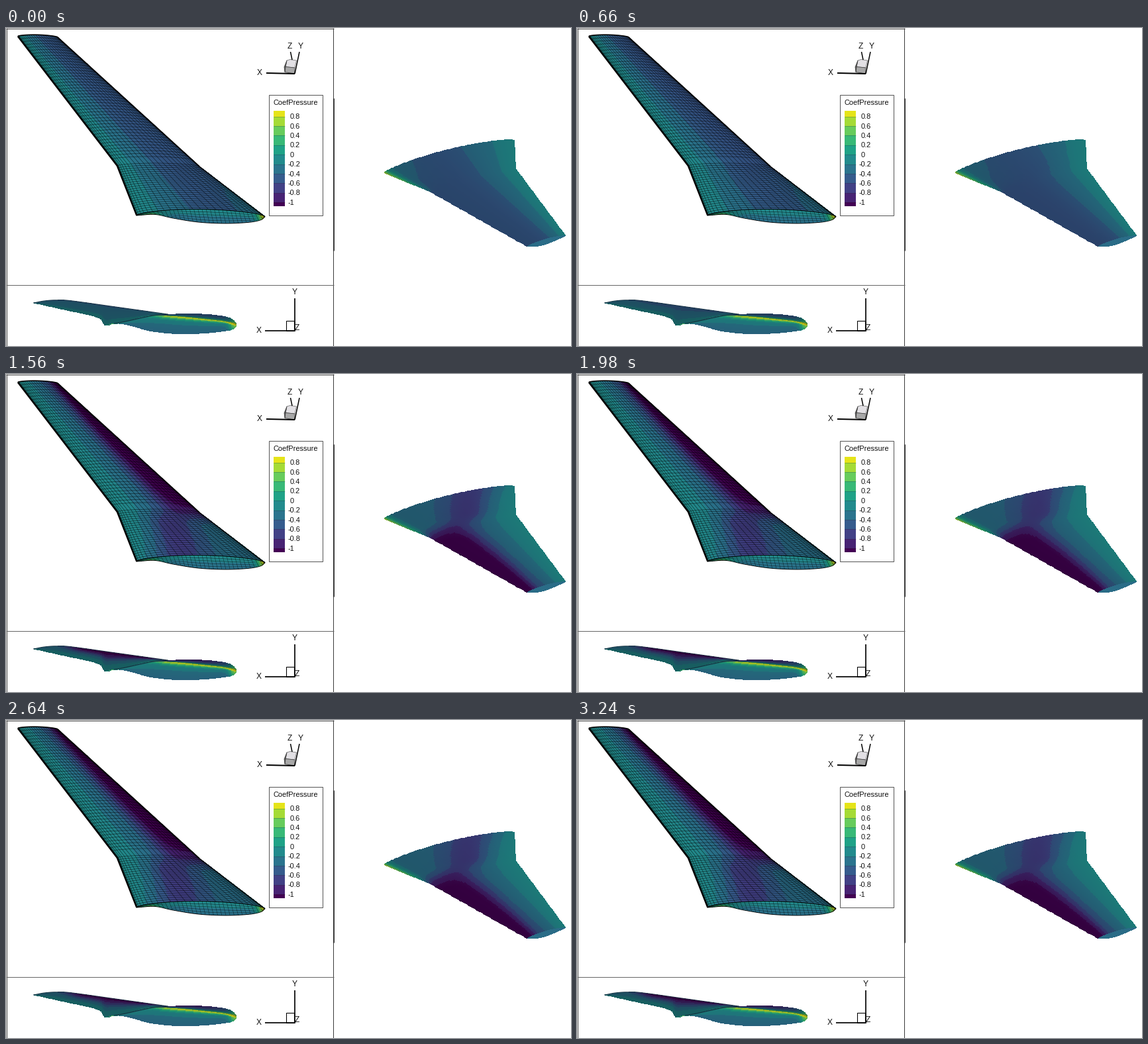
Recreate the animation shown at these times as a matplotlib script. Size 853 px wide and 480 px high, loop 3.3 s.

```python
import numpy as np
import matplotlib.pyplot as plt
from matplotlib.animation import FuncAnimation
from matplotlib.collections import LineCollection

W, H, DPI = 853, 480, 64
PX = 72 / DPI  # points per pixel
FRAMES, STEP = 55, 60
FONT = "Liberation Sans"

fig = plt.figure(figsize=(W / DPI, H / DPI), dpi=DPI, facecolor="white")
ax = fig.add_axes([0, 0, 1, 1])
ax.set_xlim(0, W)
ax.set_ylim(H, 0)
ax.axis("off")

VIRIDIS = plt.get_cmap("viridis")


def band_color(k):
    return np.array(VIRIDIS(0.96 * np.asarray(k) / 10))[..., :3]


def paint(cp, shade):
    """Pressure to softly banded, lit colour."""
    level = np.clip((cp + 1.1) / 0.2, 0, 10)
    rgb = 0.6 * band_color(np.round(level)) + 0.4 * band_color(level)
    return np.clip(rgb * np.asarray(shade)[..., None], 0, 1)


def line(xs, ys, width=1.0, color="black", z=5):
    ax.plot(xs, ys, color=color, lw=width * PX, zorder=z,
            solid_capstyle="butt", solid_joinstyle="miter")


def label(x, y, text, size, ha="center"):
    ax.text(x, y, text, fontsize=size * PX, family=FONT, ha=ha, va="center",
            color="#111111", zorder=6)


def poly(pts, face, edge="black", width=0.8):
    ax.fill(*zip(*pts), facecolor=face, edgecolor=edge, lw=width * PX, zorder=4)


def smooth(pts, n=12):
    """Catmull-Rom curve through the points."""
    p = np.array(pts, float)
    p = np.vstack([2 * p[0] - p[1], p, 2 * p[-1] - p[-2]])
    t = np.linspace(0, 1, n, endpoint=False)[:, None]
    out = []
    for a, b, c, d in zip(p, p[1:], p[2:], p[3:]):
        out.append(b + 0.5 * t * (c - a + t * (2 * a - 5 * b + 4 * c - d
                                               + t * (3 * (b - c) + d - a))))
    return np.vstack(out + [p[-2:-1]])


def mid(a):
    return (a[1:, 1:] + a[:-1, 1:] + a[1:, :-1] + a[:-1, :-1]) / 4


def sstep(x):
    x = np.clip(x, 0, 1)
    return x * x * (3 - 2 * x)


def cosine(n):
    return (1 - np.cos(np.linspace(0, np.pi, n))) / 2


class Surface:
    """Coloured mesh whose pressure depends on the flow state s."""

    def __init__(self, x, y, field, z=2):
        self.field = field
        self.mesh = ax.pcolormesh(x, y, field(0.0), shading="flat", zorder=z)

    def update(self, s):
        self.mesh.set_array(self.field(s))


def upper_cp(u, v, s, stag):
    """u: leading to trailing edge, v: root 0, kink 0.5, tip 1."""
    inb = np.clip(1 - 2 * v, 0, 1)
    out = np.clip(2 * v - 1, 0, 1)
    start = (-0.52 + 0.5 * np.clip((u - 0.35) / 0.65, 0, 1) ** 1.4
             + 0.25 * inb * np.exp(-(u / 0.25) ** 2))
    edge = 0.36 - 0.14 * out ** 3
    outer = (-1.15 + 0.72 / (1 + np.exp((edge - u) / 0.06))
             + 0.42 * np.clip((u - 0.42) / 0.58, 0, 1))
    center = 0.42 + 0.26 * inb
    inner = (-0.33 - 0.42 * np.exp(-((u - center) / 0.22) ** 2)
             + 0.3 * np.clip((u - 0.6) / 0.4, 0, 1))
    w = sstep((v - 0.32) / 0.28)
    final = inner * (1 - w) + outer * w
    return start + (final - start) * s + stag * np.sqrt(inb) * np.exp(-u / 0.025)


def wing(le, te, bump):
    le, te = np.array(le, float), np.array(te, float)
    knots = [0, 0.5, 1]

    def pos(u, v):
        def mix(i):
            return (np.interp(v, knots, le[:, i]) * (1 - u)
                    + np.interp(v, knots, te[:, i]) * u)
        arc = np.clip(np.sin(np.pi * u), 0, 1) ** 0.55
        return mix(0), mix(1) - np.interp(v, knots, bump) * arc
    return pos


def wing_surface(pos, shade, stag):
    u, v = np.meshgrid(cosine(100), np.linspace(0, 1, 141))
    x, y = pos(u, v)
    uc, vc = mid(u), mid(v)
    light = shade * (1 - 0.06 * np.cos(np.pi * uc))
    return Surface(x, y, lambda s: paint(upper_cp(uc, vc, s, stag), light))


def loft(top, bottom, cp, shade, z=2, n=150, m=26):
    """Surface between two curves given over x; cp(x, w, s), w: top to bottom."""
    a, b = smooth(top), smooth(bottom)
    xs = np.linspace(a[0, 0], a[-1, 0], n)
    ya, yb = np.interp(xs, *a.T), np.interp(xs, *b.T)
    x, w = np.meshgrid(xs, np.linspace(0, 1, m))
    y = ya + (yb - ya) * w
    xc, wc = mid(x), mid(w)
    return Surface(x, y, lambda s: paint(cp(xc, wc, s), shade + 0 * xc), z)


# --- meshed wing, upper left panel
main = wing([(391, 285), (292, 209), (78, 14)],
            [(197, 283), (168, 208), (18, 12.5)], [10.5, 4.5, 3])
surfaces = [wing_surface(main, 0.92, 0.3)]

rows = np.r_[np.linspace(0, 0.5, 23), np.linspace(0.5, 1, 43)[1:] ** 0.96]
fine, span = cosine(50), np.linspace(0, 1, 61)
grid = [np.column_stack(main(fine, np.full_like(fine, v))) for v in rows]
grid += [np.column_stack(main(np.full_like(span, u), span)) for u in cosine(27)]
ax.add_collection(LineCollection(grid, colors=(0, 0, 0, 0.68),
                                 linewidths=0.6 * PX, zorder=3))
line([18, 168, 197.5], [12.5, 208, 283], 2.6)
line([78, 292], [14, 209], 1.8)
line([292, 391], [209, 285], 1.1)
tx, ty = main(fine, np.ones_like(fine))
line(tx, ty, 1.6)

# root section of the meshed wing
rx, ry = main(cosine(40)[::-1], np.zeros(40))
belly = [(197, 283), (225, 281.5), (252, 287), (290, 293), (330, 295),
         (365, 293.5), (384, 290), (391, 285)]


def root_cp(x, w, s):
    return (-0.08 - 0.25 * w + 0.9 * w * np.exp(-((x - 216) / 20) ** 2)
            + 1.1 * np.exp(-((391 - x) / 11) ** 2))


loft(np.column_stack([rx, ry]), belly, root_cp, 0.97)
low = smooth(belly)
ribs = []
for x0 in np.arange(203, 388, 6.2):
    x1 = min(x0 + 5, 390)
    ribs.append([(x0, np.interp(x0, rx, ry)), (x1, np.interp(x1, *low.T))])
for w in (0.2, 0.4, 0.6, 0.8):
    ribs.append(np.column_stack(
        [rx, ry + w * (np.interp(rx, *low.T) - ry)]))
ax.add_collection(LineCollection(ribs, colors=(0, 0, 0, 0.6),
                                 linewidths=0.55 * PX, zorder=3))
line(rx, ry, 0.9)
line(*low.T, 0.9)

# --- front view, lower left panel
far_top = [(41, 415), (58, 411.8), (78, 410.5), (100, 411.8), (170, 421.5),
           (245, 432)]
far_low = [(41, 415), (90, 426), (138, 437), (150, 449), (163, 446),
           (178, 443.5), (222, 434), (245, 432.5)]
nose_line = [(222, 433.5), (260, 435.5), (300, 439.5), (330, 443), (348, 448)]
body_top = [(222, 433.5), (245, 432), (280, 431), (315, 433), (338, 437.5),
            (348, 446)]
body_low = [(150, 449), (170, 446.5), (190, 450), (220, 458), (260, 462),
            (300, 461), (335, 457), (345, 453), (348, 448)]


def far_cp(x, w, s):
    suction = np.exp(-(w / 0.4) ** 2) * sstep((x - 70) / 50)
    return -0.42 + 0.3 * w - s * (0.75 * suction - 0.05)


def body_cp(x, w, s):
    return (-0.45 - 0.45 * s * (1 - w) * sstep((345 - x) / 50)
            + 1.2 * w ** 4 + 0.9 * np.exp(-((348 - x) / 10) ** 2))


def under_cp(x, w, s):
    nose = sstep((x - 205) / 45)
    return (-0.02 - 0.38 * w + 0.85 * nose * np.exp(-(w / 0.17) ** 2)
            + 0.9 * np.exp(-((348 - x) / 10) ** 2)
            + 0.5 * np.exp(-((x - 160) / 12) ** 2))


surfaces += [
    loft(far_top, far_low, far_cp, 0.68),
    loft([(150, 449), (163, 446), (178, 443.5)] + nose_line, body_low,
         under_cp, 0.86, z=2.1),
    loft(body_top, nose_line, body_cp, 0.66, z=2.2),
]
line(*smooth(far_top).T, 0.8, "#15303f")
line(*smooth(far_low[4:]).T, 1.2, "#15303f")

# --- smooth wing, right side
side = wing([(570.5, 219), (642, 248), (787, 330)],
            [(768, 170), (770, 213), (845, 314)], [11.5, 5, 4])
surfaces.append(wing_surface(side, 0.8, 1.1))
ex, ey = side(cosine(30), np.ones(30))
loft(np.column_stack([ex, ey]),
     [(787, 330), (800, 330), (820, 325), (845, 314)],
     lambda x, w, s: -0.36 + 0 * x, 0.95, n=60, m=8)

# --- panel borders
GREY = "#3a3a3a"
line([0, 495], [0.5, 0.5], 1, GREY)
line([0.5, 0.5], [0, 480], 1, GREY)
line([494.5, 494.5], [0, 480], 1, GREY)
line([495.5, 495.5], [106, 336], 1, GREY)
line([0, 495], [387.5, 387.5], 1, "#666666")
line([0, 495], [479.5, 479.5], 1, GREY)

# --- axis markers
poly([(424, 49), (429, 47.5), (438.5, 49), (436, 60), (422, 58.5)],
     "#e2e0e4", "#777777")
poly([(422, 58.5), (436, 60), (435.5, 69), (421, 66.5)], "#a8a8a8", "#444444")
poly([(424, 49), (422, 58.5), (421, 66.5), (420, 59)], "#555555", "#444444")
line([393, 436], [68, 69], 2)
line([436, 443], [69, 36], 1.5)
line([432, 429.5], [48, 36], 1.5)
label(383, 68, "X", 12)
label(428, 28, "Z", 12)
label(445, 28, "Y", 12)

line([391, 436.7], [457, 457], 1.7)
line([436, 436], [408, 457], 1.7)
poly([(423, 442), (435.5, 442), (435.5, 456.5), (423, 456.5)], "white",
     width=1.1)
label(382, 457, "X", 12)
label(439.5, 453, "Z", 12)
label(436, 399, "Y", 12)

# --- legend
poly([(397.5, 100.5), (478.5, 100.5), (478.5, 282.5), (397.5, 282.5)],
     "white", "#555555", 1)
label(404, 113.3, "CoefPressure", 11, "left")
cuts = np.r_[125, 133.6 + 14.4 * np.arange(10), 269]
for k, (y0, y1) in enumerate(zip(cuts, cuts[1:])):
    ax.fill([404, 421, 421, 404], [y0, y0, y1, y1],
            color=band_color(10 - k), lw=0, zorder=5)
    if k:
        line([404, 421], [y0, y0], 0.5, "#20303088", 6)
        value = 10 - 2 * k
        text = f"{value / 10:g}"
        label(425.3 if value < 0 else 429, y0 + 0.5, text, 11, "left")


def flow_state(ms):
    """Fast transition with a small settling wobble."""
    rise = 1 / (1 + np.exp((830 - ms) / 80))
    wobble = 0.05 * np.exp(-((ms - 1500) / 350) ** 2)
    return rise + wobble


def update(i):
    s = flow_state(i * STEP)
    for surface in surfaces:
        surface.update(s)
    return [surface.mesh for surface in surfaces]


anim = FuncAnimation(fig, update, frames=FRAMES, interval=STEP, repeat=True,
                     repeat_delay=0, blit=False)
plt.show()
```
